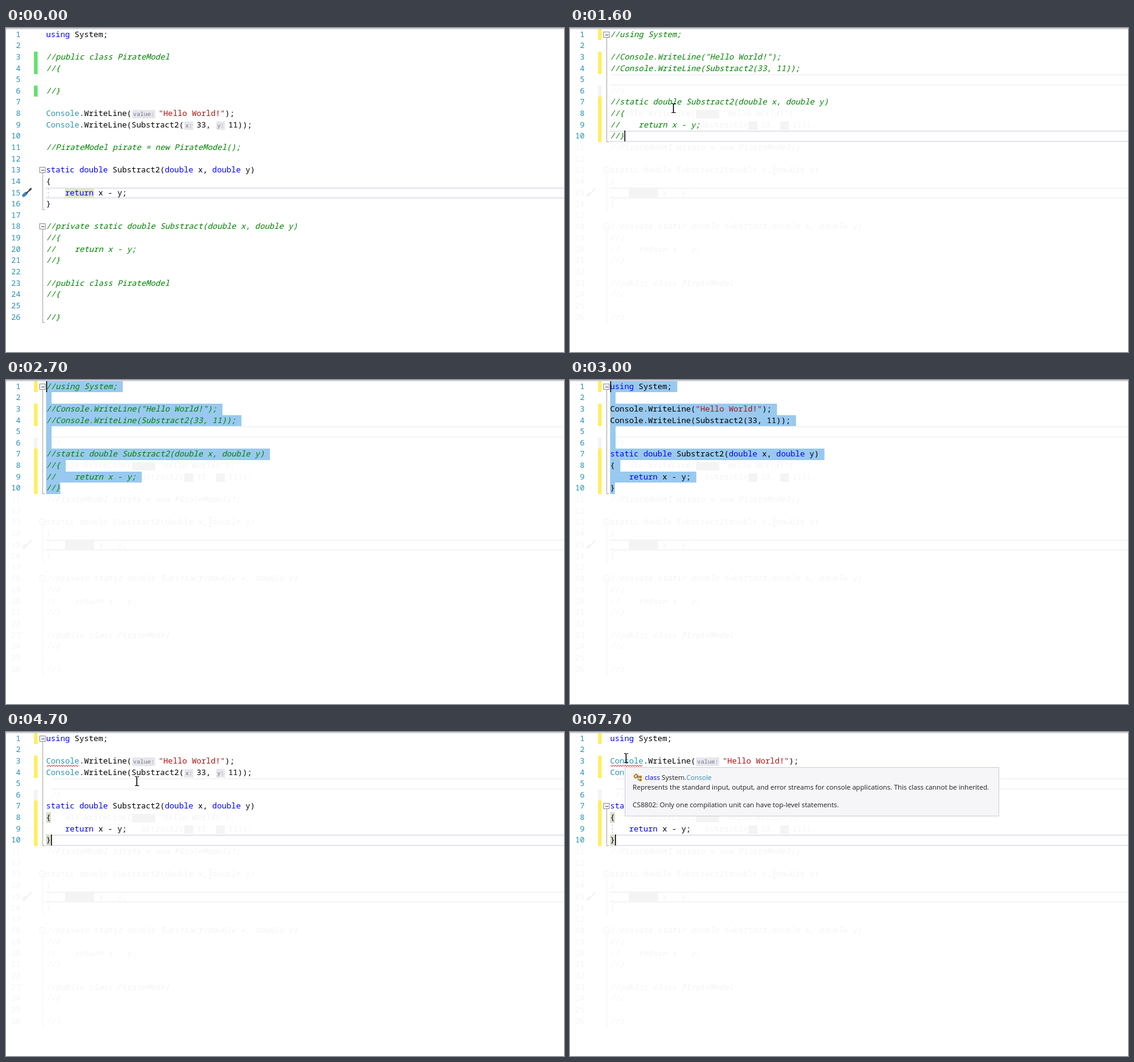
An HTML page with a canvas for the animation above (8000 ms loop, 918 px wide and 534 px high).

```html
<!DOCTYPE html>
<html lang="en">
<head>
<meta charset="utf-8">
<title>Code editor</title>
<style>
  html, body { margin: 0; width: 100%; height: 100%; overflow: hidden; background: #fff; }
  canvas { display: block; }
</style>
</head>
<body>
<canvas id="stage" width="918" height="534"></canvas>
<script>
const ctx = document.getElementById('stage').getContext('2d');
const LOOP = 8000, LEFT = 66, CHAR = 7.81;
const MONO = '"Noto Sans Mono", "DejaVu Sans Mono", monospace';
const SANS = '"Open Sans", "Noto Sans", sans-serif';
const CODE = '13.02px ' + MONO, HINT = '9.75px ' + MONO, TIP = '11.15px ' + SANS;
const BLUE = '#0000ff', TEAL = '#2b91af', GREEN = '#008000', RED = '#a31515';
const GREY = '#a5a5a5', CURRENT = '#e4e4ed', MATCH = '#dbe0cc', GHOST = '#f4f4f4';

// Inlay hints are written as [name:].
const before = `using System;

//public class PirateModel
//{

//}

Console.WriteLine([value:]"Hello World!");
Console.WriteLine(Substract2([x:]33, [y:]11));

//PirateModel pirate = new PirateModel();

static double Substract2(double x, double y)
{
    return x - y;
}

//private static double Substract(double x, double y)
//{
//    return x - y;
//}

//public class PirateModel
//{

//}`.split('\n');

const hinted = `using System;

Console.WriteLine([value:]"Hello World!");
Console.WriteLine(Substract2([x:]33, [y:]11));


static double Substract2(double x, double y)
{
    return x - y;
}`.split('\n');

const plain = hinted.map(s => s.replace(/\[\w+:\]/g, ''));
const commented = plain.map(s => s && '//' + s);

let tint = null; // when set, everything is drawn in this one colour

const rowTop = row => Math.round(1.6 + 18.64 * (row - 1));

function rect(x, y, w, h, color) {
  ctx.fillStyle = tint || color;
  ctx.fillRect(x, y, w, h);
}

function text(str, x, y, color, font) {
  ctx.font = font;
  ctx.fillStyle = tint || color;
  ctx.fillText(str, x, y);
}

const hintWidth = name => name.length * 5.85 + 9.3;

function lineWidth(str) {
  let w = 0;
  for (const part of str.split(/(\[\w+:\])/)) {
    w += part[0] === '[' ? hintWidth(part.slice(1, -1)) : part.length * CHAR;
  }
  return w;
}

function tokenColor(tok, teal) {
  if (/^(using|static|double|return)$/.test(tok)) return BLUE;
  if (tok[0] === '"') return RED;
  return teal && tok === 'Console' ? TEAL : '#000';
}

function codeLine(str, row, teal) {
  const y = rowTop(row) + 13;
  if (str.startsWith('//')) {
    text(str, LEFT, y, GREEN, 'italic ' + CODE);
    return;
  }
  let x = LEFT;
  for (const tok of str.match(/\[\w+:\]|"[^"]*"|\w+|\s+|[^\w\s"[]+/g) || []) {
    if (tok[0] === '[') {
      const name = tok.slice(1, -1), w = hintWidth(name);
      rect(x + 1, y - 10, w - 6.5, 14, '#e6e6ee');
      text(name, x + 2.5, y, '#767680', HINT);
      x += w;
    } else {
      if (tok.trim()) text(tok, x, y, tokenColor(tok, teal), CODE);
      x += tok.length * CHAR;
    }
  }
}

function numbers(from, to) {
  ctx.textAlign = 'right';
  for (let r = from; r <= to; r++) text(r, 24, rowTop(r) + 13, TEAL, CODE);
  ctx.textAlign = 'left';
}

function bar(from, to, color) {
  rect(46, rowTop(from), 6, rowTop(to + 1) - rowTop(from), color);
}

function fold(row, endRow) {
  const y = rowTop(row) + 4, end = rowTop(endRow + 1) - 1;
  rect(60, y + 9, 1, end - y - 9, GREY);
  rect(60, end, 4, 1, GREY);
  foldBox(y);
}

function foldBox(y) {
  ctx.strokeStyle = tint || '#8c8c8c';
  ctx.lineWidth = 1;
  ctx.strokeRect(55.5, y + 0.5, 9, 9);
  rect(58, y + 5, 5, 1, '#444');
}

function currentLine(row) {
  rect(65, rowTop(row), 853, 2, CURRENT);
  rect(65, rowTop(row + 1) - 2, 853, 2, CURRENT);
}

function indentGuide(row) {
  for (let y = rowTop(row) + 1; y < rowTop(row + 1); y += 6) rect(69, y, 1, 3, '#c4c4c4');
}

function stroke(points, width, color) {
  ctx.strokeStyle = tint || color;
  ctx.lineWidth = width;
  ctx.beginPath();
  points.forEach(([x, y]) => ctx.lineTo(x, y));
  ctx.stroke();
}

function screwdriver() {
  ctx.lineCap = 'round';
  stroke([[29, 276], [33, 272.5]], 5, '#3c84c0');
  stroke([[34, 272], [40, 266]], 2, '#444');
  stroke([[39, 267], [41, 265]], 3, '#444');
  ctx.lineCap = 'butt';
}

function oldFile() {
  currentLine(15);
  rect(97, rowTop(15), 48, 18, '#e1e5d5');
  numbers(1, 26);
  bar(3, 4, '#62e26c');
  bar(6, 6, '#62e26c');
  fold(13, 16);
  fold(18, 26);
  indentGuide(15);
  screwdriver();
  before.forEach((s, i) => codeLine(s, i + 1, true));
}

// Faint remains of the previous file, wiped where newer text or selection was.
function residue(t) {
  tint = GHOST;
  oldFile();
  currentLine(5);
  beam(336, 234);
  tint = null;
  commented.forEach((s, i) => {
    const y = rowTop(i + 1), h = rowTop(i + 2) - y;
    const extra = t >= 1800 && i < 9 ? 9 : 0;
    rect(0, y, 45, h, '#fff');
    rect(54, y, 12 + lineWidth(s) + extra, h, '#fff');
  });
}

function selection(lines) {
  lines.forEach((s, i) => {
    const y = rowTop(i + 1);
    rect(LEFT, y, lineWidth(s) + (i < 9 ? 9 : 0), rowTop(i + 2) - y, '#99c9ef');
  });
}

function braces(color) {
  rect(LEFT, rowTop(8), 8, 18, color);
  rect(LEFT, rowTop(10), 8, 18, color);
}

function squiggle() {
  const pts = [];
  for (let x = 67; x <= 120; x += 2) pts.push([x, (x - 67) % 4 ? 57 : 54.5]);
  stroke(pts, 1, '#e02020');
}

function beam(x, y) {
  rect(x - 0.5, y - 7, 1.5, 15, '#000');
  for (const dy of [-8, 7]) {
    rect(x - 3, y + dy, 3, 1, '#000');
    rect(x + 1, y + dy, 3, 1, '#000');
  }
}

// Pointer path as [time, x, y]; hidden outside each path.
const paths = [
  [[1000, 336, 234], [1300, 112, 179], [1400, 112, 179], [1600, 170, 132], [1800, 176, 126]],
  [[3500, 590, 150], [3700, 529, 180], [4400, 529, 180], [4700, 215, 81], [5000, 104, 50], [5200, 92, 43], [8001, 92, 43]]
];

function pointer(t) {
  for (const p of paths) {
    for (let i = 1; i < p.length; i++) {
      const [t0, x0, y0] = p[i - 1], [t1, x1, y1] = p[i];
      if (t >= t0 && t < t1) {
        const k = (t - t0) / (t1 - t0);
        beam(Math.round(x0 + (x1 - x0) * k), Math.round(y0 + (y1 - y0) * k));
      }
    }
  }
}

function caret(t) {
  const between = (a, b) => t >= a && t < b;
  const at = (x, row) => rect(x, rowTop(row), 1.5, 18, '#000');
  if (between(1400, 1800)) at(89.5, 10);
  if (between(1800, 2300) || between(2700, 3200)) at(66, 1);
  if (between(3800, 4300) || (t >= 4700 && (t - 4700) % 1000 < 500)) at(74, 10);
}

function tooltip() {
  rect(90, 58, 616, 81, '#cccedb');
  rect(91, 59, 614, 79, '#f6f6f9');
  stroke([[105, 73], [109, 69.5], [112, 72.5], [108, 76], [105, 73]], 2, '#c27d1a');
  stroke([[110, 74], [115, 74]], 1, '#555');
  stroke([[112, 74], [112, 79], [115, 79]], 1, '#555');
  rect(114, 72, 4, 4, '#c27d1a');
  rect(114, 77, 4, 4, '#c27d1a');
  let x = 123;
  for (const [s, color] of [['class ', BLUE], ['System.', '#1e1e1e'], ['Console', TEAL]]) {
    text(s, x, 79, color, TIP);
    x += ctx.measureText(s).width;
  }
  text('Represents the standard input, output, and error streams for console applications. This class cannot be inherited.', 103, 95, '#1e1e1e', TIP);
  text('CS8802: Only one compilation unit can have top-level statements.', 103, 124, '#1e1e1e', TIP);
}

function newFile(t) {
  const lines = t < 3000 ? commented : t < 3100 ? plain : hinted;
  const selected = t >= 1800 && t < 3800;
  const checked = t >= 4500, refolded = t >= 5000;

  residue(t);
  if (t < 1400) currentLine(5);
  else if (!selected) currentLine(10);
  if (selected) selection(lines);
  if (t >= 3800) braces(MATCH);
  else if (t >= 3200) braces('rgba(150, 200, 190, 0.6)');

  numbers(1, 10);
  for (const [a, b] of [[1, 1], [3, 4], [7, 10]]) bar(a, b, '#ffee62');
  if (refolded) {
    tint = GHOST;
    foldBox(rowTop(1) + 4);
    tint = null;
    fold(7, 10);
    indentGuide(9);
  } else {
    fold(1, 10);
  }
  lines.forEach((s, i) => codeLine(s, i + 1, checked));
  if (checked) squiggle();
  caret(t);
  if (t >= 5500) tooltip();
  pointer(t);
}

function draw(t) {
  rect(0, 0, 918, 534, '#fff');
  if (t < 500) {
    oldFile();
  } else {
    newFile(t);
    if (t < 600) {
      ctx.globalAlpha = 0.3;
      oldFile();
      ctx.globalAlpha = 1;
    }
  }
  rect(0, 0, 918, 2, '#cccedb');
}

function tick() {
  draw(Math.floor(performance.now() % LOOP / 100) * 100);
  requestAnimationFrame(tick);
}
tick();
</script>
</body>
</html>
```
